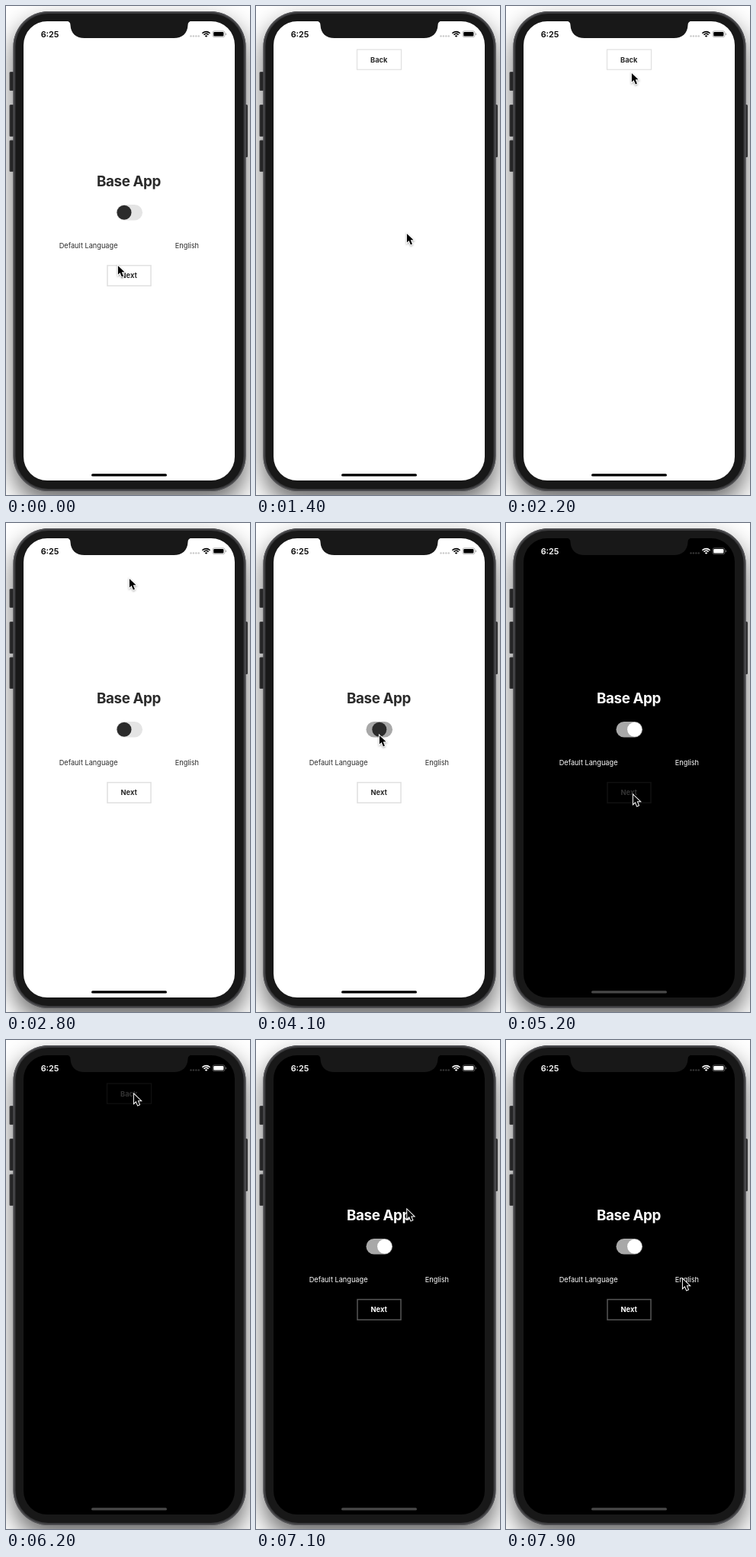
Recreate the animation shown at these times as an HTML page with a canvas. Size 320x640 px, loop 8000 ms.

```html
<!DOCTYPE html>
<html lang="en">
<head>
<meta charset="utf-8">
<title>Base App</title>
<style>
html, body { margin: 0; width: 100%; height: 100%; overflow: hidden; background: #fff; }
canvas { display: block; width: 320px; height: 640px; }
</style>
</head>
<body>
<canvas id="stage"></canvas>
<script>
const canvas = document.getElementById('stage');
const ctx = canvas.getContext('2d');
const LOOP = 8000, STEP = 100;
const ratio = window.devicePixelRatio || 1;
canvas.width = 320 * ratio;
canvas.height = 640 * ratio;

const LIGHT = { bg: '#fff', ink: '#2b2b2b', status: '#000', dots: '#c8c8c8', rim: '#a6a6a6',
  border: '#e0e0e0', home: '#000' };
const DARK = { bg: '#000', ink: '#fff', status: '#fff', dots: '#383838', rim: '#6a6a6a',
  border: '#565656', home: '#484848' };

// Cursor moves: start time, number of steps, end point
const MOVES = [
  [400, 1, 150, 356], [1300, 2, 197, 296], [1500, 1, 198, 288],
  [1800, 3, 167, 101], [2200, 2, 161, 71], [3200, 2, 152, 242],
  [3600, 3, 161, 276], [4600, 4, 166, 354], [5600, 3, 190, 230],
  [5900, 3, 167, 69], [7000, 3, 208, 273], [7400, 6, 231, 311]
];

// Button presses: start, end, page
const PRESSES = [[700, 1300, 'home'], [2500, 2800, 'back'], [5200, 5300, 'home'], [6200, 6600, 'back']];

const within = (t, a, b) => t >= a && t < b;

function cursorAt(t) {
  let x = 146, y = 338;
  for (const [start, steps, toX, toY] of MOVES) {
    if (t < start) break;
    const k = Math.min(1, ((t - start) / STEP + 1) / steps);
    const p = k * k * (3 - 2 * k);
    x += (toX - x) * p;
    y += (toY - y) * p;
  }
  return [x, y];
}

function box(x, y, w, h, r, fill) {
  ctx.beginPath();
  ctx.roundRect(x, y, w, h, r);
  ctx.fillStyle = fill;
  ctx.fill();
}

function disc(x, y, r, fill) {
  ctx.beginPath();
  ctx.arc(x, y, r, 0, Math.PI * 2);
  ctx.fillStyle = fill;
  ctx.fill();
}

function label(text, x, y, size, weight, fill, align = 'left', spacing = 0) {
  ctx.font = `${weight} ${size}px Inter, Roboto, sans-serif`;
  ctx.letterSpacing = spacing + 'px';
  ctx.textAlign = align;
  ctx.fillStyle = fill;
  ctx.fillText(text, x, y);
}

function drawPhone(c) {
  ctx.fillStyle = '#fff';
  ctx.fillRect(0, 0, 320, 640);
  ctx.save();
  ctx.shadowColor = 'rgba(0,0,0,.6)';
  ctx.shadowBlur = 32 * ratio;
  ctx.shadowOffsetY = 15 * ratio;
  box(9.5, 7, 305, 628, 46, '#3c3c3e');
  ctx.restore();

  for (const [y, h] of [[86, 25], [129, 42], [175.5, 41.5]]) {
    box(4.5, y, 7, h, 1.5, '#404042');
    box(5.5, y + 1, 5, h - 2, 1, '#262627');
  }
  box(311, 129, 6, 69, 1.5, '#323234');

  box(9.5, 7, 305, 628, 46, '#555558');
  box(10.7, 8.3, 302.6, 625.4, 45, '#3a3a3c');
  box(12.5, 10, 299, 622, 43, '#181818');
  box(23, 20, 277, 601, 31, c.bg);

  ctx.beginPath();
  ctx.moveTo(79, 19.5);
  ctx.quadraticCurveTo(84.5, 20, 84.5, 25);
  ctx.bezierCurveTo(85, 36, 92, 42, 103, 42);
  ctx.lineTo(220, 42);
  ctx.bezierCurveTo(231, 42, 238, 36, 238.5, 25);
  ctx.quadraticCurveTo(238.5, 20, 244, 19.5);
  ctx.fillStyle = '#181818';
  ctx.fill();
}

function drawStatus(c) {
  label('6:25', 45.7, 40.6, 10.8, 600, c.status);
  for (let i = 0; i < 4; i++) disc(242.5 + i * 3.4, 39.4, 1.2, c.dots);

  ctx.strokeStyle = c.status;
  ctx.lineWidth = 1.6;
  for (const r of [7, 4.2]) {
    ctx.beginPath();
    ctx.arc(262.5, 40.6, r, -Math.PI * 0.76, -Math.PI * 0.24);
    ctx.stroke();
  }
  ctx.beginPath();
  ctx.moveTo(262.5, 40.8);
  ctx.arc(262.5, 40.8, 2.4, -Math.PI * 0.76, -Math.PI * 0.24);
  ctx.fillStyle = c.status;
  ctx.fill();

  ctx.beginPath();
  ctx.roundRect(271, 32.8, 16, 7.9, 2.2);
  ctx.strokeStyle = c.rim;
  ctx.lineWidth = 0.8;
  ctx.stroke();
  box(272.2, 34, 13.2, 5.5, 1.2, c.status);
  box(287.9, 35.4, 1.1, 2.7, 0.6, c.rim);
  box(112, 612.2, 99, 3.4, 1.7, c.home);
}

function drawButton(text, x, y, w, h, line, c, pressed) {
  ctx.globalAlpha = pressed ? 0.2 : 1;
  ctx.strokeStyle = c.border;
  ctx.lineWidth = line;
  ctx.strokeRect(x, y, w, h);
  label(text, 161.2, y + 16.7, 9.3, 700, c.ink, 'center');
  ctx.globalAlpha = 1;
}

function drawToggle(t) {
  const p = t < 4000 ? 0 : t < 4100 ? 0.15 : t < 4200 ? 0.5 : 1;
  const grey = Math.round(228 - 60 * Math.min(1, p * 2));
  box(144.5, 260, 34.5, 20.6, 10.3, `rgb(${grey},${grey},${grey})`);
  disc(155 + 13.6 * p, 270.2, 9.5, p < 1 ? '#2b2b2b' : '#fff');
}

function drawHome(t, c, pressed) {
  label('Base App', 161, 235.5, 18.8, 700, c.ink, 'center', -0.4);
  drawToggle(t);
  label('Default Language', 69.7, 316.6, 9.2, 400, c.ink);
  label('English', 253, 316.6, 9.2, 400, c.ink, 'right');
  drawButton('Next', 133, 339.6, 57, 26.6, 1.5, c, pressed);
}

function drawCursor(x, y) {
  const tip = [[0.9, 2], [0.9, 13.6], [3.6, 11], [5.9, 16.4], [7.9, 15.5], [5.7, 10.3], [9.5, 10.3]];
  ctx.save();
  ctx.translate(x, y);
  ctx.beginPath();
  tip.forEach(([px, py]) => ctx.lineTo(px, py));
  ctx.closePath();
  ctx.shadowColor = 'rgba(0,0,0,.35)';
  ctx.shadowBlur = 2.5 * ratio;
  ctx.shadowOffsetY = ratio;
  ctx.strokeStyle = '#fff';
  ctx.lineWidth = 2;
  ctx.stroke();
  ctx.shadowColor = 'transparent';
  ctx.fillStyle = '#000';
  ctx.fill();
  ctx.restore();
}

function draw(now) {
  const t = Math.floor((now % LOOP) / STEP) * STEP;
  const c = t < 4200 ? LIGHT : DARK;
  const page = within(t, 1300, 2800) || within(t, 5300, 6600) ? 'back' : 'home';
  const pressed = PRESSES.some(([a, b, p]) => p === page && within(t, a, b));

  ctx.setTransform(ratio, 0, 0, ratio, 0, 0);
  drawPhone(c);
  drawStatus(c);
  if (page === 'home') drawHome(t, c, pressed);
  else drawButton('Back', 132.5, 57, 58, 26.2, 1.2, c, pressed);
  drawCursor(...cursorAt(t));
}

const origin = performance.now();
function tick() {
  draw(performance.now() - origin);
  requestAnimationFrame(tick);
}
tick();
</script>
</body>
</html>
```
